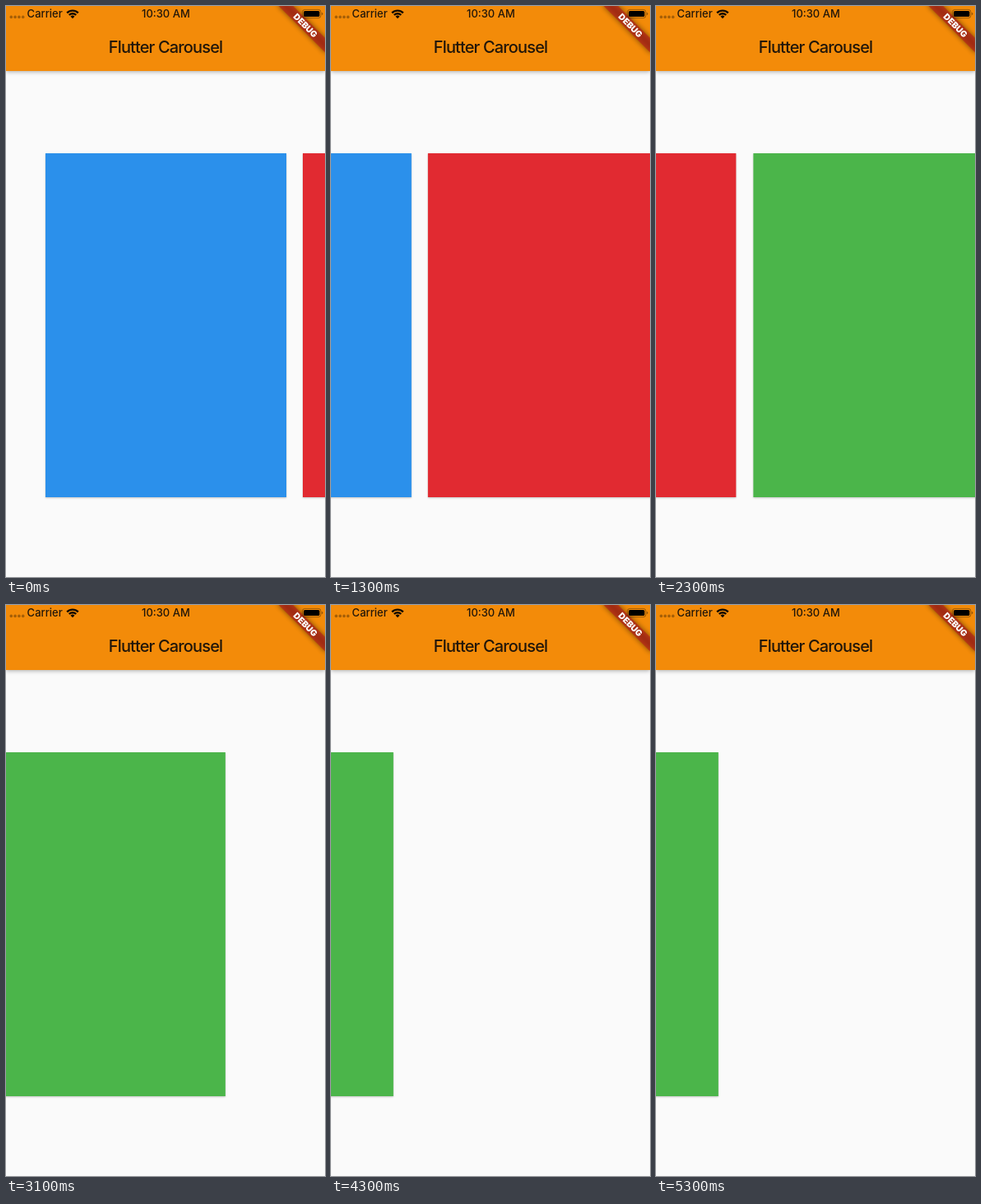
Animation of 388 by 694 pixels, one loop 5.4 s. Source, as an HTML page:

```html
<!DOCTYPE html>
<html lang="en">
<head>
<meta charset="utf-8">
<title>Carousel</title>
<style>
  html, body { margin: 0; width: 100%; height: 100%; overflow: hidden; background: #fafafa; }
  .stage { position: relative; width: 388px; height: 694px; overflow: hidden; background: #fafafa; }
  .strip { position: absolute; left: 0; top: 0; }
  .card {
    position: absolute; top: 178.5px; width: 292.8px; height: 418px;
    box-shadow: 0 1px 2px rgba(0, 0, 0, .22);
  }
  .bar {
    position: absolute; left: 0; top: 0; width: 388px; height: 78.6px;
    background: #f38b09; box-shadow: 0 1px 5px rgba(0, 0, 0, .32);
  }
  svg { position: absolute; left: 0; top: 0; }
  text { font-family: Inter, "Liberation Sans", sans-serif; font-weight: 500; fill: #21160a; }
</style>
</head>
<body>
<div class="stage">
  <div class="strip" id="strip"></div>
  <div class="bar"></div>
  <svg width="388" height="90" viewBox="0 0 388 90">
    <defs>
      <filter id="blur" x="-30%" y="-150%" width="160%" height="400%">
        <feGaussianBlur stdDeviation="3.4"/>
      </filter>
    </defs>

    <text x="194" y="56.8" font-size="20" letter-spacing="-.85" text-anchor="middle">Flutter Carousel</text>

    <!-- ribbon -->
    <g transform="translate(388 0) rotate(45)">
      <rect x="-41.4" y="27.4" width="82.8" height="12.4" opacity=".5" filter="url(#blur)"/>
      <rect x="-41.4" y="27.4" width="82.8" height="12.4" fill="#b71c1c" fill-opacity=".63"/>
      <text x="0" y="37.3" font-size="10.4" text-anchor="middle" style="font-weight:900;fill:#fff">DEBUG</text>
    </g>

    <!-- status bar -->
    <g fill="#000" fill-opacity=".32">
      <circle cx="6.3" cy="13.4" r="1.8"/>
      <circle cx="11.1" cy="13.4" r="1.8"/>
      <circle cx="15.9" cy="13.4" r="1.8"/>
      <circle cx="20.7" cy="13.4" r="1.8"/>
    </g>
    <text x="25.6" y="14.2" font-size="13">Carrier</text>
    <g transform="translate(81 15.2)" fill="none" stroke="#120b02" stroke-width="2.4">
      <path d="M-6.8-6.8A9.6 9.6 0 0 1 6.8-6.8"/>
      <path d="M-4.2-4.2A6 6 0 0 1 4.2-4.2"/>
      <path d="M0 0L-2.5-2.5A3.6 3.6 0 0 1 2.5-2.5Z" fill="#120b02" stroke="none"/>
    </g>
    <text x="194.4" y="14.2" font-size="13" text-anchor="middle">10:30 AM</text>
    <rect x="360.5" y="4.4" width="22.4" height="10.2" rx="2.9" fill="none" stroke="#000" stroke-opacity=".35"/>
    <rect x="362" y="5.9" width="19.4" height="7.2" rx="1.6"/>
    <path d="M384 7.8q1.4 .5 1.4 1.7t-1.4 1.7z" fill-opacity=".4"/>
  </svg>
</div>
<script>
  const LOOP = 5400, STEP = 100, PITCH = 313.5, LEFT = 47.9;
  const PERIOD = 1000, FIRST = 900, SLIDE = 800, LAG = 18;
  const END = 2 * PITCH, OVER = 3 * PITCH;
  const strip = document.getElementById('strip');

  ['#2b90eb', '#e12a31', '#4bb54a'].forEach((color, i) => {
    const card = document.createElement('div');
    card.className = 'card';
    card.style.left = LEFT + i * PITCH + 'px';
    card.style.background = color;
    strip.append(card);
  });

  // cubic-bezier(.4, 0, .2, 1), solved by bisection
  function ease(x) {
    if (x >= 1) return 1;
    let lo = 0, hi = 1;
    for (let i = 0; i < 30; i++) {
      const u = (lo + hi) / 2, v = 1 - u;
      if (1.2 * u * v * v + .6 * u * u * v + u * u * u < x) lo = u; else hi = u;
    }
    return lo * lo * (3 - 2 * lo);
  }

  // overdamped spring, from 1 at rest towards 0
  function spring(ms) {
    const t = Math.max(0, ms) / 1000, w = Math.sqrt(200), d = Math.sqrt(.21);
    const a = w * (1.1 - d), b = w * (1.1 + d);
    return (b * Math.exp(-a * t) - a * Math.exp(-b * t)) / (b - a);
  }

  const bounce = ms => END + PITCH * spring(ms - LAG);

  function scrollAt(t) {
    if (t < FIRST) return 0;
    const n = Math.floor((t - FIRST) / PERIOD);
    const ms = (t - FIRST) % PERIOD;
    const from = n < 3 ? n * PITCH : bounce(PERIOD - SLIDE);
    const to = Math.min((n + 1) * PITCH, OVER);
    if (n >= 2 && ms > SLIDE) return bounce(ms - SLIDE);
    return from + (to - from) * ease(ms / SLIDE);
  }

  const frames = [];
  for (let t = 0; t <= LOOP; t += STEP) {
    const x = scrollAt(Math.min(t, LOOP - STEP));
    frames.push({ offset: t / LOOP, easing: 'steps(1, end)', transform: `translateX(${-x.toFixed(2)}px)` });
  }
  strip.animate(frames, { duration: LOOP, iterations: Infinity });
</script>
</body>
</html>
```
